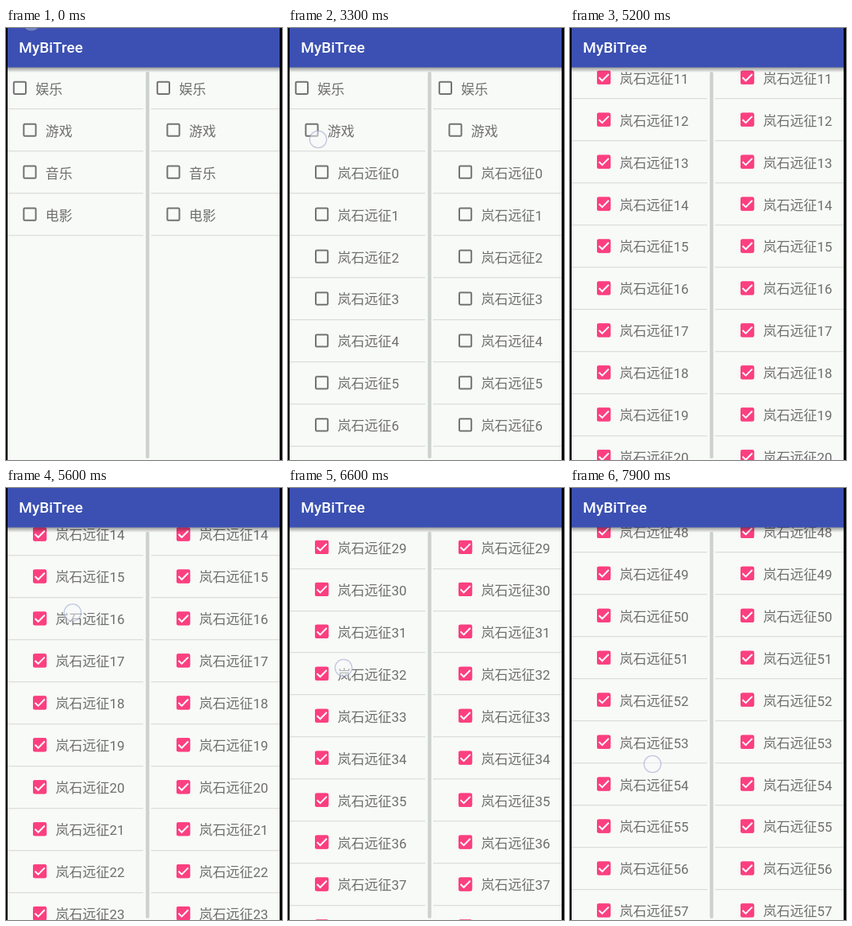
Write an HTML page with a canvas that moves like this. It is 348x543 px and loops after 8000 ms.

```html
<!DOCTYPE html>
<html lang="zh-CN">
<head>
<meta charset="utf-8">
<title>MyBiTree</title>
<style>
  html, body { margin: 0; width: 100%; height: 100%; overflow: hidden; background: #000; }
  canvas { display: block; }
</style>
</head>
<body>
<canvas id="stage" width="348" height="543"></canvas>
<script>
const ctx = document.getElementById('stage').getContext('2d');
const LOOP = 8000, STEP = 100;
const PITCH = 52.95, FIRST_ROW = 75.7;
const EXPAND_AT = 2400, CHECK_AT = 3500;
const COLUMNS = [{ shift: 0, left: 2, right: 173 }, { shift: 181, left: 183, right: 345 }];
const GREY = '#727272', PINK = '#fc3f80', PAPER = '#f8faf7';
const FONT = "Roboto, 'Noto Sans CJK SC', 'Noto Sans CJK', sans-serif";

// [time, list offset]
const SCROLL = [
  [4100, 0], [4400, 190], [4600, 430], [4800, 590], [5000, 665], [5200, 701.4],
  [5400, 715], [5500, 760], [5700, 980], [6000, 1192.5], [6300, 1300], [6400, 1440],
  [6600, 1642.3], [6800, 1990], [7000, 2270], [7300, 2510.7], [7600, 2632], [7800, 2666], [7900, 2668.4]
];

// A finger keeps its place on the list, so its y follows the scroll offset.
const TOUCHES = [
  { from: 1900, to: 2300, x0: 92, x1: 92, y: 130.5 },
  { from: 3300, to: 3500, x0: 38, x1: 38, y: 140 },
  { from: 4200, to: 4400, x0: 92, x1: 84, y: 250 },
  { from: 5500, to: 5700, x0: 92, x1: 76, y: 41 },
  { from: 6400, to: 6600, x0: 90, x1: 70, y: 226 },
  { from: 7800, to: 7900, x0: 104, x1: 104, y: 347 }
];

const clamp = v => Math.min(1, Math.max(0, v));
const progress = (t, from, to) => clamp((t - from) / (to - from));
const secant = i => SCROLL[i + 1] && SCROLL[i]
  ? (SCROLL[i + 1][1] - SCROLL[i][1]) / (SCROLL[i + 1][0] - SCROLL[i][0]) : 0;

function slope(i) {
  const a = secant(i - 1), b = secant(i);
  return a * b > 0 ? 2 * a * b / (a + b) : 0;
}

// Monotone cubic interpolation
function scrollAt(t) {
  const last = SCROLL.length - 1;
  if (t <= SCROLL[0][0]) return 0;
  if (t >= SCROLL[last][0]) return SCROLL[last][1];
  const i = SCROLL.findIndex(k => k[0] > t) - 1;
  const [t0, y0] = SCROLL[i], [t1, y1] = SCROLL[i + 1];
  const h = t1 - t0, u = (t - t0) / h, v = 1 - u;
  return y0 * (1 + 2 * u) * v * v + y1 * u * u * (3 - 2 * u)
    + h * u * v * (slope(i) * v - slope(i + 1) * u);
}

function rowAt(index, t) {
  if (index === 0) return { label: '娱乐', level: 0, checked: 0 };
  const checked = progress(t, CHECK_AT - STEP, CHECK_AT + 2 * STEP);
  if (index === 1) return { label: '游戏', level: 1, checked };
  if (t >= EXPAND_AT) return { label: '岚石远征' + (index - 2), level: 2, checked };
  const label = ['音乐', '电影'][index - 2];
  return label && { label, level: 1, checked: 0 };
}

function disc(x, y, r, fill, stroke) {
  ctx.beginPath();
  ctx.arc(x, y, r, 0, 2 * Math.PI);
  if (fill) { ctx.fillStyle = fill; ctx.fill(); }
  if (stroke) { ctx.strokeStyle = stroke; ctx.lineWidth = 1.3; ctx.stroke(); }
}

function roundRect(x, y, w, h, r) {
  ctx.beginPath();
  ctx.roundRect(x, y, w, h, r);
}

function drawCheckbox(x, y, checked) {
  ctx.save();
  ctx.translate(x, y);
  ctx.lineWidth = 2;
  ctx.strokeStyle = checked > 0 ? PINK : GREY;
  roundRect(-7.6, -7.6, 15.2, 15.2, 1.3);
  ctx.stroke();
  if (checked > 0) {
    const hole = 7 * (1 - checked);
    ctx.fillStyle = PINK;
    roundRect(-8.5, -8.5, 17, 17, 2);
    ctx.fill();
    ctx.fillStyle = PAPER;
    ctx.fillRect(-hole, -hole, 2 * hole, 2 * hole);
  }
  if (checked === 1) {
    ctx.strokeStyle = '#fff';
    ctx.beginPath();
    ctx.moveTo(-6, 0);
    ctx.lineTo(-2, 4);
    ctx.lineTo(6.2, -4.3);
    ctx.stroke();
  }
  ctx.restore();
}

function drawList(t, scroll) {
  const first = Math.max(0, Math.floor(scroll / PITCH) - 1);
  ctx.font = '17px ' + FONT;
  for (let i = first; i < first + 13; i++) {
    const row = rowAt(i, t);
    if (!row) break;
    const y = FIRST_ROW + i * PITCH - scroll;
    for (const { shift, left, right } of COLUMNS) {
      const x = 17.4 + row.level * 12.6 + shift;
      drawCheckbox(x, y - 0.4, row.checked);
      ctx.fillStyle = '#6e6e6e';
      ctx.fillText(row.label, x + 19.8, y + 7);
      ctx.fillStyle = '#dddedc';
      ctx.fillRect(left, Math.round(y + 25.7), right - left, 1.3);
    }
  }
}

function drawRipples(t) {
  if (t >= EXPAND_AT && t < 2700) {
    ctx.save();
    ctx.beginPath();
    ctx.rect(2, 104, 171, 50);
    ctx.clip();
    disc(92.5, 130, 36, 'rgba(0,0,0,.05)');
    ctx.restore();
  }
  if (t >= 3400 && t < 4100) {
    const alpha = 0.13 * (1 - progress(t, 3600, 4100));
    disc(30, 129, 8 + 11 * progress(t, 3300, 3600), `rgba(90,90,90,${alpha})`);
  }
}

function drawToolbar() {
  const shadow = ctx.createLinearGradient(0, 49, 0, 56);
  shadow.addColorStop(0, 'rgba(0,0,0,.4)');
  shadow.addColorStop(1, 'rgba(0,0,0,0)');
  ctx.fillStyle = shadow;
  ctx.fillRect(2, 49, 343, 7);
  ctx.fillStyle = '#3b50b2';
  ctx.fillRect(2, 0, 343, 49.5);
  ctx.fillStyle = '#fff';
  ctx.font = '500 19px ' + FONT;
  ctx.fillText('MyBiTree', 16.3, 30.5);
}

function drawTouches(t) {
  const blob = 0.4 * (1 - progress(t, 400, 800));
  if (blob > 0) disc(32, -7.5, 11, `rgba(205,205,215,${blob})`);
  for (const { from, to, x0, x1, y } of TOUCHES) {
    if (t < from || t > to) continue;
    const x = x0 + (x1 - x0) * progress(t, from, to);
    disc(x, y + scrollAt(to) - scrollAt(t), 10.7, 'rgba(247,248,252,.5)', 'rgba(150,160,200,.55)');
  }
}

function draw(t) {
  ctx.fillStyle = '#000';
  ctx.fillRect(0, 0, 348, 543);
  ctx.save();
  ctx.beginPath();
  ctx.rect(2, 0, 343, 543);
  ctx.clip();
  ctx.fillStyle = PAPER;
  ctx.fillRect(2, 0, 343, 543);
  drawRipples(t);
  drawList(t, scrollAt(t));
  ctx.fillStyle = '#cdd1cd';
  roundRect(176.3, 55, 4.4, 486, 2);
  ctx.fill();
  drawToolbar();
  drawTouches(t);
  ctx.restore();
}

const start = performance.now();
function frame() {
  const t = (performance.now() - start) % LOOP;
  draw(Math.floor(t / STEP) * STEP);
  requestAnimationFrame(frame);
}
frame();
</script>
</body>
</html>
```
